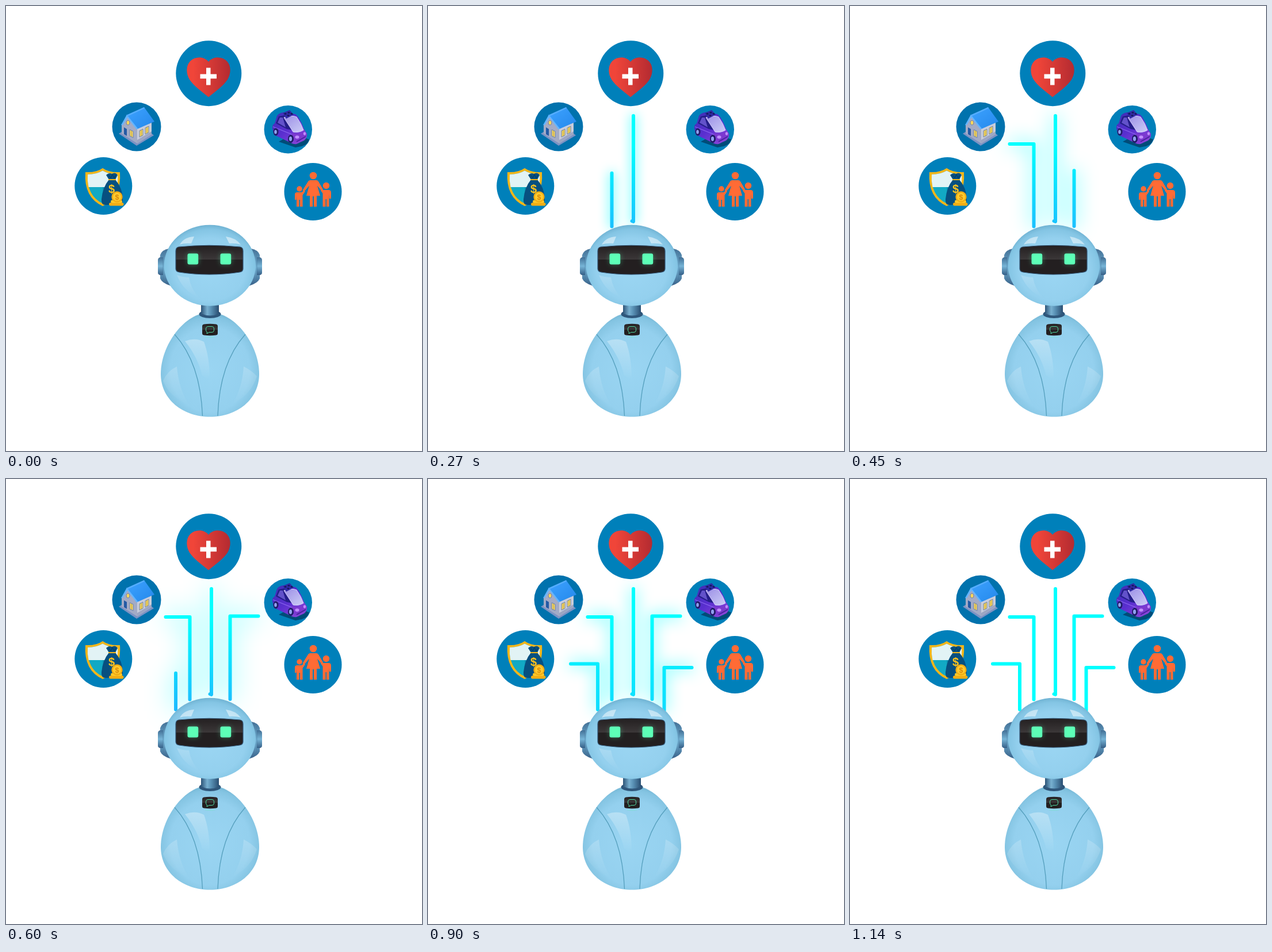
These frames come from a looping animation (723 by 774 pixels, 1.92 s). An HTML page:

```html
<!DOCTYPE html>
<html lang="en">
<head>
<meta charset="utf-8">
<title>Robot assistant</title>
<style>
  html, body { margin: 0; width: 100%; height: 100%; overflow: hidden; background: #fff; }
  svg { display: block; width: 723px; height: 774px; }
  text { font-family: "Liberation Sans", Arial, sans-serif; font-weight: bold; text-anchor: middle; }
</style>
</head>
<body>
<svg viewBox="0 0 723 774" xmlns="http://www.w3.org/2000/svg">
  <defs>
    <linearGradient id="beam" gradientUnits="userSpaceOnUse" x1="0" y1="190" x2="0" y2="403">
      <stop offset="0" stop-color="#0ff"/>
      <stop offset=".25" stop-color="#0ff"/>
      <stop id="low" offset="1" stop-color="#1eb9ff"/>
    </linearGradient>
    <filter id="blur" filterUnits="userSpaceOnUse" x="100" y="60" width="520" height="500" color-interpolation-filters="sRGB">
      <feGaussianBlur id="spread" stdDeviation="1"/>
    </filter>
    <filter id="soft" x="-1" y="-1" width="3" height="3"><feGaussianBlur stdDeviation="5"/></filter>
    <linearGradient id="heart"><stop offset=".15" stop-color="#f04539"/><stop offset="1" stop-color="#b42b31"/></linearGradient>
    <linearGradient id="roof" x2="1" y2="1"><stop offset="0" stop-color="#3ea3ff"/><stop offset="1" stop-color="#2488ec"/></linearGradient>
    <linearGradient id="car" x2=".8" y2="1"><stop offset="0" stop-color="#3a2fb4"/><stop offset=".55" stop-color="#5a2fd0"/><stop offset="1" stop-color="#8b45d8"/></linearGradient>
    <linearGradient id="glass" x2="1" y2="1"><stop offset="0" stop-color="#9c8fe6"/><stop offset="1" stop-color="#cccdf6"/></linearGradient>
    <radialGradient id="skull" cx=".5" cy=".55" r=".55">
      <stop offset="0" stop-color="#9bd6f3"/><stop offset=".7" stop-color="#94d0ee"/>
      <stop offset=".9" stop-color="#84c5e4"/><stop offset="1" stop-color="#70b3d3"/>
    </radialGradient>
    <radialGradient id="torso" cx=".5" cy=".55" r=".56">
      <stop offset="0" stop-color="#9ad5f2"/><stop offset=".72" stop-color="#94d0ee"/>
      <stop offset=".9" stop-color="#84c4e2"/><stop offset="1" stop-color="#70b3d1"/>
    </radialGradient>
    <linearGradient id="ear" x2="0" y2="1">
      <stop offset="0" stop-color="#426f95"/><stop offset=".5" stop-color="#76b4d6"/><stop offset="1" stop-color="#365f87"/>
    </linearGradient>
    <linearGradient id="neck">
      <stop offset="0" stop-color="#2e5578"/><stop offset=".35" stop-color="#78b0d0"/>
      <stop offset=".55" stop-color="#5b93b7"/><stop offset="1" stop-color="#2a4f72"/>
    </linearGradient>
    <linearGradient id="shine" x2="0" y2="1">
      <stop offset="0" stop-color="#fff" stop-opacity=".5"/><stop offset="1" stop-color="#fff" stop-opacity="0"/>
    </linearGradient>
    <linearGradient id="visor" x2="0" y2="1">
      <stop offset="0" stop-color="#231f20"/><stop offset=".48" stop-color="#3b3738"/>
      <stop offset=".49" stop-color="#231f20"/><stop offset="1" stop-color="#231f20"/>
    </linearGradient>
    <g id="earShape">
      <path d="M283 422Q271 424 268 433V474Q271 482 287 487Z" fill="url(#ear)"/>
      <path d="M268 437Q264 438 264 442V464Q264 467 268 468H273V437Z" fill="url(#ear)"/>
      <path d="M273 430V478" stroke="#3f6f95" stroke-opacity=".45" fill="none"/>
    </g>
  </defs>

  <g id="glow" filter="url(#blur)" fill="none" stroke="#0ff" stroke-width="6" stroke-linecap="round" stroke-linejoin="round"></g>
  <g id="lines" fill="none" stroke="url(#beam)" stroke-width="6" stroke-linecap="round" stroke-linejoin="round"></g>

  <g fill="#0080ba">
    <circle cx="352.3" cy="117.2" r="57"/>
    <circle cx="227" cy="210" r="42.5" fill="#0072ad"/>
    <circle cx="490.3" cy="214.7" r="41.7"/>
    <circle cx="169.3" cy="313" r="50"/>
    <circle cx="533.5" cy="323" r="50"/>
  </g>

  <!-- health -->
  <path d="M352 97C345 87.500 329 87 320.500 95.500C312 104 313 118 319 128C326 139 342 150 352 158.500C362 150 378 139 385 128C391 118 392 104 383.500 95.500C375 87 359 87.500 352 97Z" fill="url(#heart)"/>
  <path d="M348 107.500h7.500v11h10.500v7.800h-10.500v11.200h-7.500v-11.200h-10.500v-7.800h10.500Z" fill="#fff"/>

  <!-- home -->
  <g>
    <path d="M196 222L227 243L257 225L250 219L204 217Z" fill="#7d93c4"/>
    <path d="M201 207L210 191L228 214V239L201 222Z" fill="#a3abc6"/>
    <path d="M228 213L253 201V223L228 239Z" fill="#c9cddb"/>
    <path d="M228 233L253 218V223L228 239Z" fill="#9da6c3"/>
    <path d="M209 190L240 176L258 201L228 214Z" fill="url(#roof)"/>
    <path d="M210 189L200 207L203 207L211 194L227 215L229 213Z" fill="#64b5ff"/>
    <path d="M209 190L240 176L241 178L211 192Z" fill="#55adff"/>
    <path d="M205 211L210 214V226L205 223Z" fill="#245aa5"/>
    <path d="M215 215L221 218V229L215 226ZM232 217L238 214V225L232 228ZM242 212L248 209V220L242 223Z" fill="#ffd85a" stroke="#6680b4"/>
    <path d="M235 216V226M245 211V221M218 217V227" stroke="#8d9155" stroke-width=".8"/>
    <ellipse cx="212" cy="203" rx="3" ry="4" fill="#ffd85a" stroke="#6680b4"/>
  </g>

  <!-- car -->
  <g>
    <path d="M474 236L499 222L527 232Q525 241 514 244L503 246Z" fill="#004c78"/>
    <path d="M463 213Q462 207 467 204L471 191Q474 186 482 185L503 188Q510 193 518 214L523 222Q524 229 518 234L505 240Q500 241 495 238L466 224Z" fill="url(#car)"/>
    <path d="M469 204L474 192L484 190L498 216L488 214Z" fill="#251e8a"/>
    <path d="M472 203L476 194L481 194L486 211Z" fill="#6252ca"/>
    <path d="M483 194Q496 189 505 193Q513 204 517 216Q508 221 499 219Z" fill="url(#glass)" stroke="#d8ceff" stroke-width="1"/>
    <path d="M497 221Q510 224 520 218L523 226L504 237Q497 231 497 221Z" fill="#7c39cf"/>
    <path d="M464 210L496 223L499 237" fill="none" stroke="#8a65ee" stroke-width="1.200"/>
    <path d="M481 186L493 181L500 189L487 196Z" fill="#302aa5"/>
    <path d="M483 187l3-1 2 2-3 1ZM489 185l3-1 2 2-3 1ZM488 190l3-1 2 2-3 1ZM494 187l3-1 2 2-3 1Z" fill="#151554"/>
    <ellipse cx="469" cy="219" rx="4.500" ry="6.500" fill="#201a68"/>
    <ellipse cx="468.500" cy="219" rx="2.300" ry="3.600" fill="#8fa0ee"/>
    <ellipse cx="495" cy="231" rx="5" ry="7" fill="#201a68"/>
    <ellipse cx="494.500" cy="231" rx="2.600" ry="4" fill="#8fa0ee"/>
    <ellipse cx="506" cy="228" rx="3.600" ry="2.800" fill="#c08cff"/>
    <ellipse cx="519" cy="222" rx="2.200" ry="2.800" fill="#c08cff"/>
    <path d="M505 236L521 227" stroke="#4b239f" stroke-width="2"/>
  </g>

  <!-- savings -->
  <g>
    <path d="M168 282Q179 290 198 289Q201 333 168 348Q135 333 138 289Q157 290 168 282Z" fill="#f4b619"/>
    <path d="M168 286.500Q179 293 194 293Q196 330 168 343.500Q140 330 142 293Q157 293 168 286.500Z" fill="#12a9c4"/>
    <path d="M168 286.500V315H143.500Q141 304 142 293Q157 293 168 286.500Z" fill="#e2f3f5"/>
    <path d="M168 315H192.500Q188 335 168 343.500Z" fill="#0e94b4"/>
    <path d="M168 286.500Q179 293 194 293Q195 305 192.500 315H168Z" fill="#e2f3f5"/>
    <path d="M174 294Q179 289 184 292Q190 288 194 294L190 302Q203 317 203 337Q203 346 195 346H173Q165 346 166 336Q168 315 179 302Z" fill="#075080"/>
    <path d="M178 302H191" stroke="#f4b619" stroke-width="2"/>
    <path d="M178 294L182 299L185 293L188 299L191 294" fill="none" stroke="#033d68" stroke-width="1.200"/>
    <text x="183.500" y="324.500" font-size="20" fill="#ffc21d">$</text>
    <rect x="179" y="342" width="25.500" height="5.500" rx="2.700" fill="#f1ad15"/>
    <rect x="182" y="337.500" width="20" height="5" rx="2.500" fill="#ffc928"/>
    <circle cx="193" cy="332" r="9.700" fill="#f1ad15"/>
    <circle cx="193" cy="332" r="7.200" fill="#ffcb2e"/>
    <text x="193" y="336.500" font-size="12.500" fill="#d98a0b">$</text>
  </g>

  <!-- family -->
  <g fill="#ff6b35">
    <circle cx="534" cy="295" r="6.300"/>
    <circle cx="510" cy="318" r="4.700"/>
    <circle cx="556.500" cy="312.500" r="5.700"/>
    <path d="M529 303H539Q542 303 543.500 306L551 319L548.500 321.500L541 312.500L546 330H540V349H535V331H533V349H528V330H522L527 312.500L518 323L515.500 320.500L524.500 306Q526 303 529 303Z"/>
    <path d="M506 324H514L518 320.500L520 322.500L515.500 329V349H511V337H509.500V349H505V330L504.500 337H502V328Q502 324 506 324Z"/>
    <path d="M551 320H561Q565 320 565 325V335H562L561.500 327V349H557V336H555.500V349H550.500V326L547 321L549 318Z"/>
  </g>

  <!-- robot -->
  <g>
    <path d="M354.500 533C399 533 440 590 440 640C440 685 401 714.500 354.500 714.500C308 714.500 269 685 269 640C269 590 310 533 354.500 533Z" fill="url(#torso)"/>
    <path d="M311 583Q329 576 344 584Q354 611 354 650L341 643Q333 610 311 583Z" fill="url(#shine)" opacity=".65"/>
    <path d="M273 652Q280 635 297 627Q300 665 318 694Q284 680 273 652ZM436 644Q427 634 413 627Q411 663 394 692Q426 676 436 644Z" fill="url(#shine)" opacity=".4"/>
    <path d="M293 571Q338 621 341.500 713M416 571Q371 621 368 713" fill="none" stroke="#559fbd" stroke-width="1.300"/>
    <ellipse cx="354.500" cy="536" rx="19" ry="7" fill="#2f577b"/>
    <path d="M339 515H370V535Q355 542 339 535Z" fill="url(#neck)"/>
    <use href="#earShape"/>
    <use href="#earShape" transform="translate(709 0) scale(-1 1)"/>
    <ellipse cx="354.300" cy="451.200" rx="79.600" ry="70.500" fill="url(#skull)"/>
    <path d="M302 415Q309 402 327 401L322 413Q310 412 302 415ZM382 401Q399 403 408 415Q398 412 388 413Z" fill="#fff" opacity=".48"/>
    <path d="M297 468Q307 472 318 472Q321 492 336 508Q308 496 297 468Z" fill="url(#shine)" opacity=".4"/>
    <path d="M300 419Q353 413.500 407 419Q412 420 412 426V457Q412 462 406 463Q353 471 301 463Q295 462 295 457V426Q295 420 300 419Z" fill="url(#visor)" stroke="#35597a" stroke-width="1.200"/>
    <g fill="#5dffb7">
      <g filter="url(#soft)" opacity=".38">
        <rect x="316" y="431" width="18" height="18"/><rect x="373" y="431" width="18" height="18"/>
      </g>
      <rect x="315.500" y="430.500" width="18.700" height="19" rx="3"/>
      <rect x="372.500" y="430.500" width="18.700" height="19" rx="3"/>
    </g>
    <path d="M344 553.500Q354.500 552 365 553.500Q368 554 368 557V569Q368 572 365 572.500Q354.500 574 344 572.500Q341 572 341 569V557Q341 554 344 553.500Z" fill="url(#visor)"/>
    <path d="M351 557.500H358Q361.500 557.500 361.500 561V564Q361.500 567.500 358 567.500H353L349 570L349.500 567Q347.500 566 347.500 564V561Q347.500 557.500 351 557.500Z" fill="none" stroke="#4fd6a0"/>
    <path d="M346 575.500Q354.500 577 363 575.500" fill="none" stroke="#5dffb7" stroke-opacity=".4"/>
  </g>
</svg>
<script>
const LOOP = 1920, STEP = 30, END = 1140;

// path, start and end of drawing in ms
const beams = [
  ["M354.5 374L357 375V191", 0, 180],
  ["M319.5 383.500V240H277.500", 180, 360],
  ["M389.5 383V238.500H438.500", 360, 540],
  ["M295 401V321.500H248", 540, 660],
  ["M410.5 403V328H458.500", 660, 780],
];

const $ = id => document.getElementById(id);
const clamp = v => Math.min(1, Math.max(0, v));

const strokes = beams.map(([d, from, to]) => {
  const paths = ["glow", "lines"].map(id => {
    const p = document.createElementNS("http://www.w3.org/2000/svg", "path");
    p.setAttribute("d", d);
    return $(id).appendChild(p);
  });
  return { paths, from, to, length: paths[0].getTotalLength() };
});

function draw(t) {
  for (const { paths, from, to, length } of strokes) {
    const k = clamp((t - from) / (to - from));
    for (const p of paths) {
      p.style.display = k ? "" : "none";
      p.setAttribute("stroke-dasharray", k < 1 ? `${k * length} 999` : "none");
    }
  }

  // the halo widens while drawing, then closes in on the lines
  const sigma = 25 * Math.min(t / 690, (END - t) / (END - 690));
  $("glow").style.display = sigma > 0.2 ? "" : "none";
  $("spread").setAttribute("stdDeviation", Math.max(sigma, 0.2));

  const c = clamp((t - 720) / 360);
  $("low").setAttribute("stop-color", `rgb(${30 - 30 * c},${185 + 70 * c},255)`);
}

function tick() {
  const t = performance.now() % LOOP;
  draw(Math.min(END, Math.floor(t / STEP) * STEP));
  requestAnimationFrame(tick);
}
tick();
</script>
</body>
</html>
```
